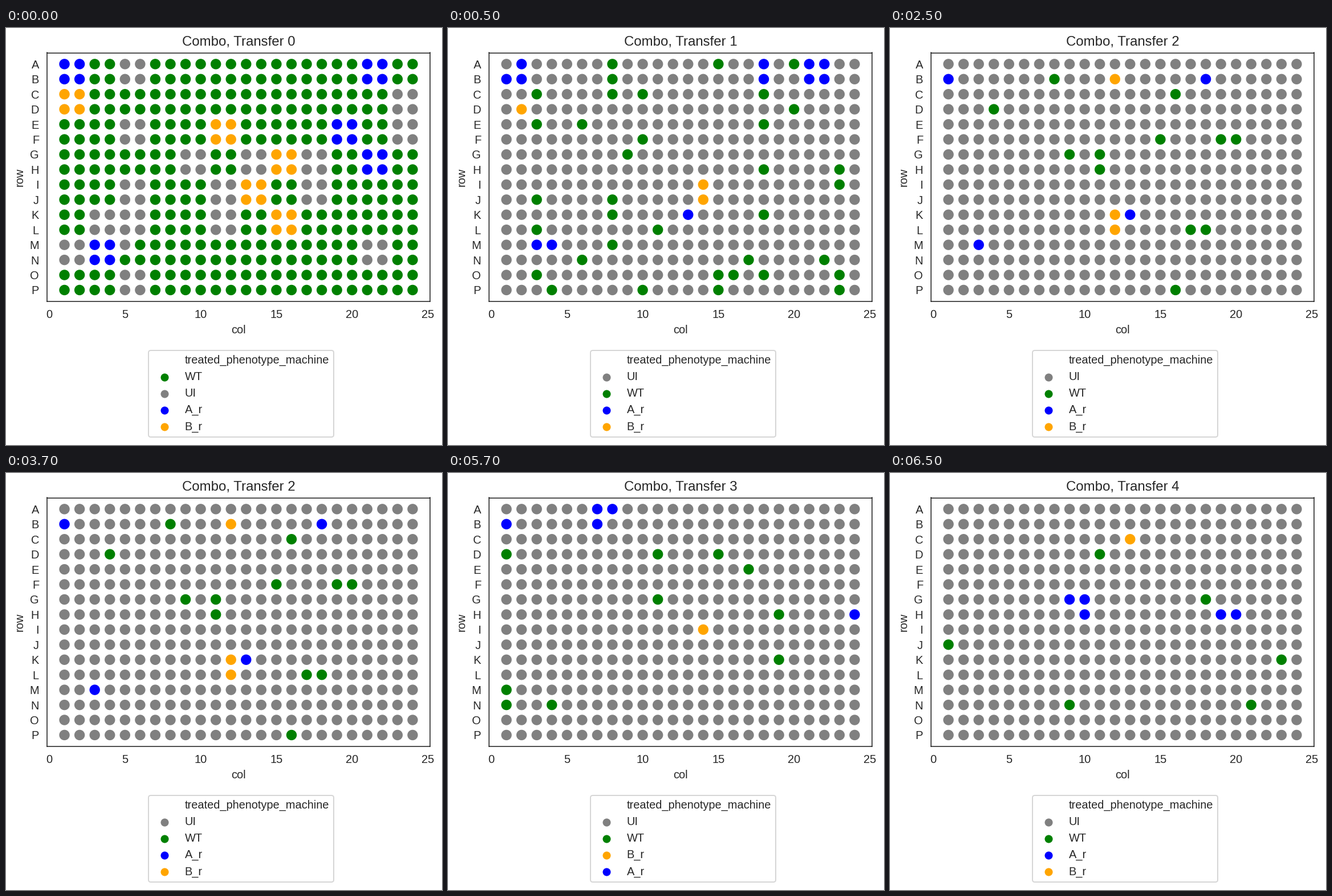
A matplotlib script that plays this animation: 765 px wide and 732 px high, repeating every 8 s.

```python
import matplotlib.pyplot as plt
import numpy as np
from matplotlib.animation import FuncAnimation
from matplotlib.lines import Line2D

WIDTH, HEIGHT, DPI = 765, 732, 144
STEP_MS, STEPS = 500, 16
ROWS, COLS = "ABCDEFGHIJKLMNOP", 24
INK = "0.15"
COLORS = {"WT": "green", "UI": "gray", "A_r": "blue", "B_r": "orange"}

# Per transfer: label -> wells ("A1" or block "A1-B2"), in legend order.
# The label without wells fills the rest of the plate.
TRANSFERS = [
    {
        "WT": "",
        "UI": "A5-B6 C23-F24 E5-F6 G9-H10 G13-H14 G17-J18 I5-L6 I11-L12 "
              "K3-L4 M1-N2 M5 M21-N22 O5-P6",
        "A_r": "A1-B2 A21-B22 E19-F20 G21-H22 M3-N4",
        "B_r": "C1-D2 E11-F12 G15-H16 I13-J14 K15-L16",
    },
    {
        "UI": "",
        "WT": "A8-C8 A15 A20 C3 C10 C18 D20 E3 E6 E18 F10 G9 H18 H23-I23 J3 "
              "J8-K8 K18 L3 L11 M8 N6 N17 N22 O3 O15-O16 O18 O23-P23 P4 P10 P15",
        "A_r": "A2-B2 B1 A18-B18 A21-B22 K13 M3-M4",
        "B_r": "D2 I14-J14",
    },
    {
        "UI": "",
        "WT": "B8 C16 D4 F15 F19-F20 G9 G11-H11 L17-L18 P16",
        "A_r": "B1 B18 K13 M3",
        "B_r": "B12 K12-L12",
    },
    {
        "UI": "",
        "WT": "D1 D11 D15 E17 G11 H19 K19 M1-N1 N4",
        "B_r": "I14",
        "A_r": "A7-A8 B1 B7 H24",
    },
    {
        "UI": "",
        "WT": "D11 G18 J1 K23 N9 N21",
        "A_r": "G9-G10 H10 H19-H20",
        "B_r": "C13",
    },
]

plt.rcParams.update({
    "font.family": "Liberation Sans",
    "text.color": INK,
    "axes.labelcolor": INK,
    "axes.edgecolor": INK,
    "xtick.labelcolor": INK,
    "ytick.labelcolor": INK,
})


def well_index(name):
    return ROWS.index(name[0]), int(name[1:]) - 1


def plate_colors(groups):
    plate = np.full((len(ROWS), COLS), COLORS[next(iter(groups))], dtype=object)
    for label, wells in groups.items():
        for block in wells.split():
            corners = block.split("-")
            top, left = well_index(corners[0])
            bottom, right = well_index(corners[-1])
            plate[top:bottom + 1, left:right + 1] = COLORS[label]
    return plate.ravel().tolist()


def pixel_axes(left, top, width, height):
    return fig.add_axes([left / WIDTH, 1 - (top + height) / HEIGHT,
                         width / WIDTH, height / HEIGHT])


def draw_legend(labels):
    handles = [Line2D([], [], linestyle="none")]
    handles += [ax.scatter([], [], color=COLORS[label]) for label in labels]
    ax.legend(handles, ["treated_phenotype_machine", *labels],
              loc="lower left", borderaxespad=0,
              bbox_to_anchor=(249.6 / WIDTH, 14.4 / HEIGHT),
              bbox_transform=fig.transFigure)
    for handle in handles[1:]:
        handle.remove()


fig = plt.figure(figsize=(WIDTH / DPI, HEIGHT / DPI), dpi=DPI)
ax = pixel_axes(72, 43.5, 672, 436.3)
ax.set_xlim(-0.15, 25.15)
ax.set_ylim(15.75, -0.75)
ax.set_xticks(range(0, 26, 5))
ax.set_yticks(range(len(ROWS)), list(ROWS))
ax.tick_params(bottom=False, left=False)
ax.set_xlabel("col")
ax.set_ylabel("row")
row_grid, col_grid = np.mgrid[0:len(ROWS), 1:COLS + 1]
dots = ax.scatter(col_grid.ravel(), row_grid.ravel(), s=100,
                  edgecolors="white", linewidths=0.8)


def update(step):
    # The first plate shows for one step, each later one for four.
    transfer = (step + 3) // 4
    groups = TRANSFERS[transfer]
    dots.set_facecolor(plate_colors(groups))
    ax.set_title(f"Combo, Transfer {transfer}")
    draw_legend(list(groups))
    return [dots]


animation = FuncAnimation(fig, update, frames=STEPS, interval=STEP_MS,
                          repeat=True, repeat_delay=0)
plt.show()
```
